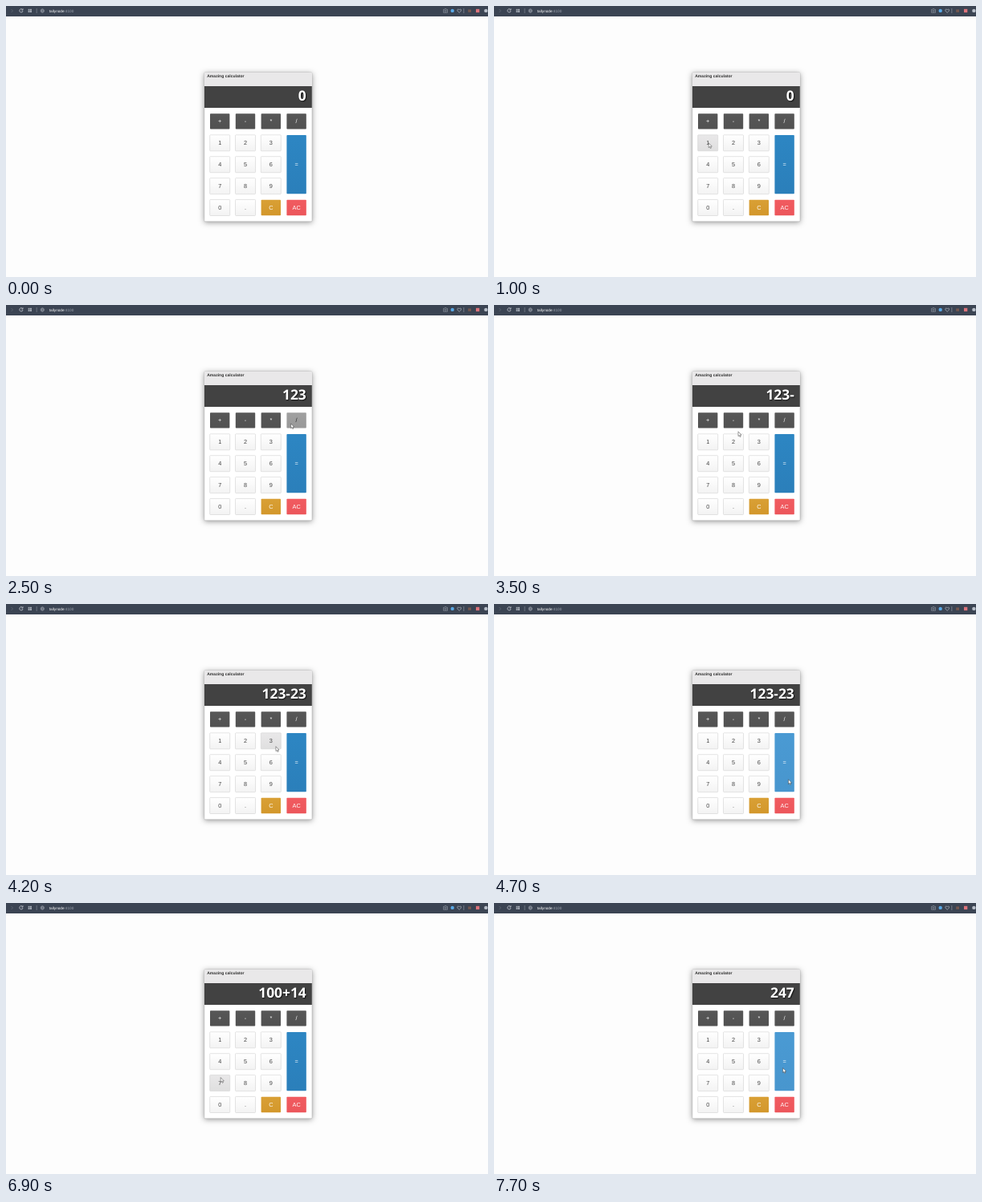
An HTML page with a canvas that plays this animation: 600x338 px, repeating every 8 s.

```html
<!DOCTYPE html>
<html lang="en">
<head>
<meta charset="utf-8">
<title>Calculator</title>
<style>
  html, body { margin: 0; width: 100%; height: 100%; overflow: hidden; background: #fdfdfd; }
  canvas { display: block; width: 600px; height: 338px; }
</style>
</head>
<body>
<canvas id="stage"></canvas>
<script>
const W = 600, H = 338, LOOP = 8000, STEP = 100;
const SANS = "'Liberation Sans', Arial, sans-serif";
const DISPLAY = "'Open Sans', 'Noto Sans', sans-serif";

const canvas = document.getElementById('stage');
const ctx = canvas.getContext('2d');
const dpr = window.devicePixelRatio || 1;
canvas.width = W * dpr;
canvas.height = H * dpr;
ctx.scale(dpr, dpr);
ctx.textRendering = 'geometricPrecision';

// fill and over are [top, bottom] of a gradient
const STYLES = {
  digit: { fill: ['#ffffff', '#f3f3f3'], over: ['#e9e8e9', '#dfdfdf'], ink: '#444', inkOver: '#444', edge: '#d2d2d2' },
  op:    { fill: ['#575757', '#515151'], over: ['#a0a0a0', '#989898'], ink: '#fff', inkOver: '#222' },
  eq:    { fill: ['#2d86c3', '#2b7fba'], over: ['#4a9ad3', '#4896ce'], ink: '#fff', inkOver: '#fff' },
  clear: { fill: ['#d9a035', '#d3972b'], over: ['#dfae54', '#dba84a'], ink: '#fff', inkOver: '#fff' },
  reset: { fill: ['#f15b60', '#ec565b'], over: ['#f47a7e', '#f17377'], ink: '#fff', inkOver: '#fff' }
};
const SPECIAL = { '=': 'eq', 'C': 'clear', 'AC': 'reset' };

const KEY_W = 25, KEY_H = 20, PITCH_X = 31.8, PITCH_Y = 26.9;
const keys = {};
['+ - * /', '1 2 3 =', '4 5 6', '7 8 9', '0 . C AC'].forEach((line, row) => {
  line.split(' ').forEach((label, col) => {
    keys[label] = {
      label,
      style: STYLES[SPECIAL[label] || (row ? 'digit' : 'op')],
      x: 253.7 + col * PITCH_X,
      y: 133.9 + row * PITCH_Y,
      w: KEY_W,
      h: label === '=' ? KEY_H + 2 * PITCH_Y : KEY_H
    };
  });
});

// Times are in ticks of 100 ms; dx, dy shift the aim from the key's centre
const stops = [{ at: 3, x: 527, y: 192 }];
function visit(at, label, dx = 1, dy = 0) {
  const k = keys[label];
  stops.push({ at, x: k.x + k.w / 2 + dx, y: k.y + k.h / 2 + dy });
}
function press(at, label, dx, dy) {
  visit(at, label, dx, dy);
  stops[stops.length - 1].key = label;
}
press(10, '1');
press(14, '2');
press(18, '3');
visit(22, '=', 0, 30);
visit(25, '/', -7, 4);
visit(27, '*', 6, 1);
visit(30, '-', 3, -2);
press(33, '-', 6, 0);
press(36, '2', 6, 1);
press(39, '3');
press(49, '=', 10, 28);
press(58, '+', 3, 3);
press(63, '1', 3, 1);
press(66, '4');
press(70, '7');
press(75, '=', -2, 8);

// The pointer rests one tick on each stop, then glides to the next
function pointerAt(tick) {
  const i = stops.findLastIndex(s => s.at <= tick);
  if (i < 0) return null;
  const a = stops[i], b = stops[i + 1] || a;
  const k = Math.max(0, (tick - a.at - 1) / (b.at - a.at - 1 || 1));
  const e = b === a ? 0 : k * k * (3 - 2 * k);
  return { x: a.x + (b.x - a.x) * e, y: a.y + (b.y - a.y) * e };
}

function solve(sum) {
  const [, a, op, b] = sum.match(/(\d+)([+-])(\d+)/);
  return String(op === '+' ? +a + +b : a - b);
}

// A key shows its effect two ticks after the pointer arrives
function readingAt(tick) {
  return stops.filter(s => s.key && s.at + 2 <= tick).reduce((shown, { key }) =>
    key === '=' ? solve(shown) : shown === '0' ? key : shown + key, '0');
}

function rect(x, y, w, h, color) {
  ctx.fillStyle = color;
  ctx.fillRect(x, y, w, h);
}

function dot(x, y, r, color) {
  ctx.fillStyle = color;
  ctx.beginPath();
  ctx.arc(x, y, r, 0, Math.PI * 2);
  ctx.fill();
}

function stroke(d, color, width) {
  ctx.strokeStyle = color;
  ctx.lineWidth = width;
  ctx.stroke(new Path2D(d));
}

function text(str, x, y, font, color, align = 'left') {
  ctx.font = font;
  ctx.textAlign = align;
  ctx.fillStyle = color;
  ctx.fillText(str, x, y);
}

function drawToolbar() {
  rect(0, 0, W, 13, '#3b4453');
  stroke('M6.5 4l2 2-2 2', '#6a7280', 0.6);
  stroke('M20.4 4.3A2.1 2.1 0 1 0 21 6M21 3.2v1.8h-1.8', '#dde0e6', 0.65);
  for (const x of [27.6, 30]) for (const y of [3.8, 6.1]) rect(x, y, 2, 1.9, '#a4abb5');
  rect(37.8, 3, 0.6, 6, '#8a919d');
  stroke('M43.1 6a2.2 2.2 0 1 0 4.4 0a2.2 2.2 0 1 0-4.4 0M43.1 6h4.4M45.3 3.8c-1.4 1.3-1.4 3.1 0 4.4c1.4-1.3 1.4-3.1 0-4.4', '#b9bfc8', 0.45);

  const font = '4.7px ' + SANS;
  text('tallynode', 53.8, 7.7, font, '#fff');
  text(':4100', 53.8 + ctx.measureText('tallynode').width, 7.7, font, '#a0a7b2');

  stroke('M544.6 4.3h1.2l.6-.8h1.4l.6.8h1.1v4h-4.9zM546 6.2a1.1 1.1 0 1 0 2.2 0a1.1 1.1 0 1 0-2.2 0', '#a9b0bb', 0.5);
  dot(555.7, 5.9, 2.2, '#5aa9e6');
  stroke('M564.2 8.3c-4-2.8-2.4-5.4 0-3.6c2.4-1.8 4 .8 0 3.6z', '#c5cad2', 0.6);
  rect(569.6, 3, 0.6, 6, '#9aa1ac');
  rect(575.2, 4.4, 3.8, 3.4, '#74574f');
  rect(585, 3.8, 4.3, 4.3, '#dc737b');
  dot(597.4, 5.9, 2.2, '#b9c0ca');
}

function drawKey({ x, y, w, h, style, label }, hovered) {
  const [top, bottom] = hovered ? style.over : style.fill;
  const inset = style.edge ? 0 : 0.3;
  const fill = ctx.createLinearGradient(0, y, 0, y + h);
  fill.addColorStop(0, top);
  fill.addColorStop(1, bottom);
  ctx.beginPath();
  ctx.roundRect(x + inset, y + inset, w - 2 * inset, h - 2 * inset, 0.8);
  ctx.fillStyle = fill;
  ctx.fill();
  if (style.edge) {
    ctx.strokeStyle = style.edge;
    ctx.lineWidth = 0.6;
    ctx.stroke();
  }
  text(label, x + w / 2, y + h / 2 + 2.5, '7.3px ' + SANS, hovered ? style.inkOver : style.ink, 'center');
}

function drawCalculator(tick, pointer) {
  ctx.save();
  ctx.shadowColor = 'rgba(0,0,0,.42)';
  ctx.shadowBlur = 7 * dpr;
  ctx.shadowOffsetY = 1.3 * dpr;
  ctx.beginPath();
  ctx.roundRect(246.8, 83, 134.2, 185.8, 1);
  ctx.fillStyle = '#fff';
  ctx.fill();
  ctx.restore();
  ctx.strokeStyle = '#aaa';
  ctx.lineWidth = 0.5;
  ctx.stroke();

  rect(247, 83.2, 133.8, 17, '#e9e8e9');
  text('Amazing calculator', 250.2, 88.7, 'bold 5.05px ' + SANS, '#2e2e2e');
  rect(247, 100, 133.8, 27, '#424242');

  ctx.save();
  ctx.shadowColor = 'rgba(0,0,0,.75)';
  ctx.shadowBlur = 1.2 * dpr;
  ctx.shadowOffsetX = ctx.shadowOffsetY = 0.8 * dpr;
  text(readingAt(tick), 373.8, 118.3, 'bold 17.4px ' + DISPLAY, '#fff', 'right');
  ctx.restore();

  for (const key of Object.values(keys)) {
    const hovered = pointer &&
      pointer.x >= key.x && pointer.x <= key.x + key.w &&
      pointer.y >= key.y && pointer.y <= key.y + key.h;
    drawKey(key, hovered);
  }
}

function drawPointer({ x, y }) {
  ctx.save();
  ctx.translate(x, y);
  const arrow = new Path2D('M0 0v5.8l1.3-1.2l.9 2.1l1-.4l-.9-2h1.8z');
  ctx.fillStyle = '#fff';
  ctx.fill(arrow);
  ctx.strokeStyle = '#3a3a3a';
  ctx.lineWidth = 0.5;
  ctx.stroke(arrow);
  ctx.restore();
}

const start = performance.now();

function frame() {
  const tick = Math.floor((performance.now() - start) % LOOP / STEP);
  const pointer = pointerAt(tick);
  rect(0, 0, W, H, '#fdfdfd');
  drawToolbar();
  drawCalculator(tick, pointer);
  if (pointer) drawPointer(pointer);
  requestAnimationFrame(frame);
}
frame();
</script>
</body>
</html>
```
